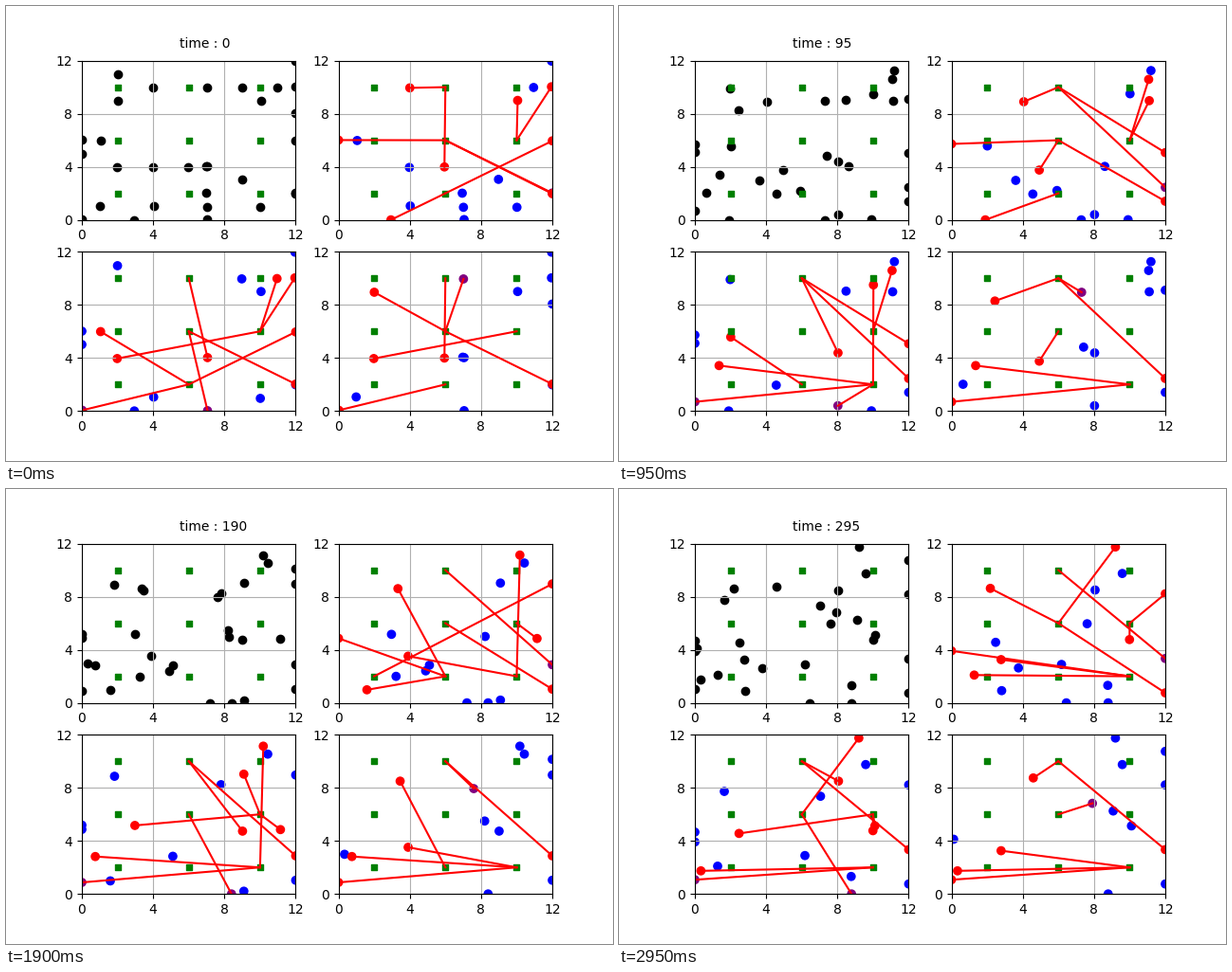
Recreate the animation shown at these times as a matplotlib script. Size 640x480 px, loop 3 s.

```python
import numpy as np
import matplotlib.pyplot as plt
from matplotlib.animation import FuncAnimation
from matplotlib.collections import LineCollection

FRAMES, STEP, INTERVAL = 60, 5, 50
SIZE = 12
SPEED = 0.011  # same for everyone
PHASE = 48  # how long a link lasts
STATIONS = [(x, y) for x in (2, 6, 10) for y in (2, 6, 10)]
# top, centre, bottom, right, lower right, lower left
NAMES = {"T": (6, 10), "C": (6, 6), "B": (6, 2), "R": (10, 6), "S": (10, 2), "L": (2, 2)}


class Agent:
    """Walks straight along a heading in degrees and stops at the walls.

    turns: (time, new heading). route: the station linked in each phase.
    linked, idle: the panels that show the agent with and without its link.
    A hub is purple in its first linked panel.
    """

    def __init__(self, x, y, heading, *turns, linked="", idle="", route="", hub=False):
        self.start = np.array([x, y], float)
        self.legs = [(0, heading), *turns]
        self.linked, self.idle, self.route, self.hub = linked, idle, route, hub

    def position(self, t):
        spot = self.start
        ends = [begin for begin, _ in self.legs[1:]] + [np.inf]
        for (begin, heading), end in zip(self.legs, ends):
            length = SPEED * max(min(t, end) - begin, 0)
            angle = np.radians(heading)
            spot = np.clip(spot + length * np.array([np.cos(angle), np.sin(angle)]), 0, SIZE)
        return spot

    def station(self, t):
        return NAMES[self.route[round(t / PHASE)]]

    def color(self, panel):
        if self.hub and panel == self.linked[0]:
            return "purple"
        return "red" if panel in self.linked else "blue"


agents = [
    # upper rows
    Agent(2, 11, -91, (110, -99), idle="b"),
    Agent(2, 9, -80, (72, 12), linked="c", route="CTTBBTT"),
    Agent(4, 10, -87, (128, 179), linked="a", route="TTTRBBC"),
    Agent(7, 10, -74, linked="c", route="CCTTTTC", hub=True),
    Agent(9, 10, -118, (105, -131), idle="b"),
    Agent(10, 9, -1, (233, -90), linked="a", idle="bc", route="RRRRLSR"),
    Agent(11, 10, -153, linked="b", idle="a", route="RSSSRRT"),
    Agent(12, 12, -137, idle="abc"),
    # right wall
    Agent(12, 10, 148, linked="ab", idle="c", route="RRRSSTC"),
    Agent(12, 8, 90, (235, 13), idle="c"),
    Agent(12, 6, -58, (117, -176), linked="ab", route="BTTRRRR"),
    Agent(12, 2, 24, linked="abc", route="CCTTTTT", hub=True),
    Agent(12, 2, -33, (135, -14), linked="a", idle="bc", route="CCCCCCC"),
    # left wall
    Agent(0, 6, 168, (55, -125), linked="a", idle="b", route="CCCBBBS"),
    Agent(0, 5, 175, (235, -128), idle="b"),
    Agent(1, 6, -23, (219, -146), linked="b", idle="a", route="BBBTRRR"),
    # middle rows
    Agent(2, 4, -108, (60, 174), (133, -111), linked="bc", route="RSSSSSS"),
    Agent(4, 4, -111, idle="a"),
    Agent(6, 4, -167, linked="ac", route="TRCSSSS"),
    Agent(7, 4, 115, (32, 41), idle="c"),
    Agent(7, 4, 20, linked="b", idle="c", route="TTTTTRR"),
    Agent(9, 3, 111, (235, 130), idle="a"),
    Agent(7, 2, 169, idle="a"),
    # lower rows
    Agent(4, 1, 59, (210, -5), idle="ab"),
    Agent(0, 0, 68, (60, 170), linked="bc", route="BBSSSBS", hub=True),
    Agent(1, 1, 98, (60, 126), (125, 101), idle="c"),
    Agent(3, 0, 180, (102, 106), linked="a", idle="b", route="BBBBBSS"),
    Agent(7, 1, -75, (170, -175), (235, -117), idle="a"),
    Agent(7, 0, 21, (102, -70), linked="b", idle="ac", route="CSSCCCC", hub=True),
    Agent(10, 1, -74, (58, -125), (140, 160), (195, 106), idle="ab"),
]

fig, axes = plt.subplots(2, 2, figsize=(6.4, 4.8), dpi=100)
ticks = range(0, SIZE + 1, 4)
for ax in axes.flat:
    ax.set(xlim=(0, SIZE), ylim=(0, SIZE), xticks=ticks, yticks=ticks)
    ax.grid(True)


def scatter(ax, members, colors):
    return ax.scatter(*zip(*[m.start for m in members]), c=colors)


overview = axes[0, 0]
label = overview.text(5.5, 13, "", fontsize=10)
crowd = scatter(overview, agents, "black")

panels = []
for name, ax in zip("abc", axes.flat[1:]):
    idle = [a for a in agents if name in a.idle]
    linked = [a for a in agents if name in a.linked]
    members = idle + linked
    dots = scatter(ax, members, [a.color(name) for a in members])
    lines = LineCollection([], colors="red", linewidths=1.5, capstyle="projecting", zorder=2)
    ax.add_collection(lines, autolim=False)
    panels.append((members, linked, dots, lines))

for ax in axes.flat:
    ax.scatter(*zip(*STATIONS), s=16, c="green", marker="s")


def draw(frame):
    t = frame * STEP
    # the first picture already shows one step of walking
    spots = {a: a.position(t + STEP) for a in agents}
    label.set_text(f"time : {t}")
    crowd.set_offsets(list(spots.values()))
    for members, linked, dots, lines in panels:
        dots.set_offsets([spots[a] for a in members])
        lines.set_segments([[spots[a], a.station(t)] for a in linked])


anim = FuncAnimation(fig, draw, frames=FRAMES, interval=INTERVAL, repeat=True, repeat_delay=0)
plt.show()
```
